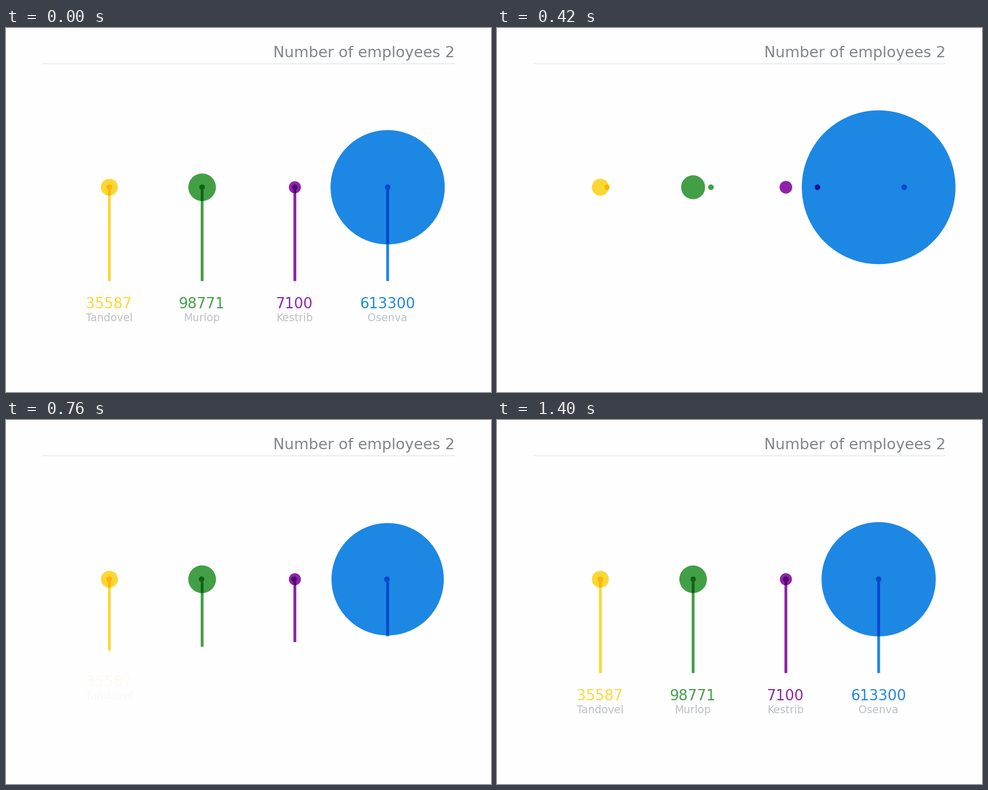
A matplotlib script that plays this animation: 864x648 px, repeating every 5.52 s.

```python
import numpy as np
import matplotlib.pyplot as plt
from matplotlib.animation import FuncAnimation
from matplotlib.colors import to_rgb

W, H = 864, 648
STEP, LOOP = 20, 5520
BLANK_AT, SETTLED = 60, 1600
BACKGROUND = "#fefefe"
MID_Y, DOT_R, STEM_W = 283.5, 5, 5
STEM_TOP, STEM_BOTTOM = 288.5, 450.5
# Each kind of part starts staggered but ends together.
DOT_END, STEM_END, FADE_END = 1590, 1310, 1400

plt.rcParams["font.family"] = "DejaVu Sans"


class Item:
    def __init__(self, index, name, value, color, bubble_at, dot_at):
        self.x = 432 + (index - 1.5) * 165.25
        self.radius = 9.7 + 1.5e-4 * value
        self.rgb = np.array(to_rgb(color))
        self.bubble_at = bubble_at
        self.dot_at = dot_at
        self.stem_at = 530 + 30 * index
        self.fade_at = 746 + 20 * index
        self.slide_at = 770 + 17 * index
        self.texts = [
            (label(self.x - 0.7, 499, str(value), 25.8, color), 499),
            (label(self.x - 0.7, 522, name, 18.9, "#bdc1c6"), 522),
        ]


def label(x, y, text, size, color, ha="center"):
    return fig.text(x / W, 1 - y / H, text, size=size, color=color,
                    ha=ha, va="baseline")


def ease_out(t, start, end, power):
    p = np.clip((t - start) / (end - start), 0, 1)
    return 1 - (1 - p) ** power


def elastic(t, start, duration=785):
    u = 10 * (t - start) / duration
    if u <= 0:
        return 0
    return 1 - 2 ** -u * np.cos(u * 2 * np.pi / 3)


def dot_travel(t, start):
    """Damped swing from 0 to 1, or None before launch."""
    if t < start:
        return None
    s = 1424 * (t - start) / (DOT_END - start) - 117
    return 1 + 0.38 * np.exp(-0.0098 * s) * np.sin(0.0085 * s)


def multiply(img, x0, x1, y0, y1, rgb, coverage):
    """Multiply a colour into a window, weighted by antialiased coverage."""
    left, right = max(int(x0) - 1, 0), min(int(x1) + 2, W)
    top, bottom = max(int(y0) - 1, 0), min(int(y1) + 2, H)
    if left >= right or top >= bottom:
        return
    px = np.arange(left, right)[None, :] + 0.5
    py = np.arange(top, bottom)[:, None] + 0.5
    cover = coverage(px, py)[..., None]
    img[top:bottom, left:right] *= 1 - cover * (1 - rgb)


def disc(img, x, y, r, rgb):
    if r > 0:
        multiply(img, x - r, x + r, y - r, y + r, rgb,
                 lambda px, py: np.clip(r + 0.5 - np.hypot(px - x, py - y), 0, 1))


def bar(img, x, top, bottom, width, rgb):
    def span(p, a, b):
        return np.clip(np.minimum(p + 0.5, b) - np.maximum(p - 0.5, a), 0, 1)

    a, b = x - width / 2, x + width / 2
    if bottom > top:
        multiply(img, a, b, top, bottom, rgb,
                 lambda px, py: span(px, a, b) * span(py, top, bottom))


def paint(t):
    img = np.empty((H, W, 3))
    img[:] = to_rgb(BACKGROUND)
    for item in items:
        disc(img, item.x, MID_Y, item.radius * elastic(t, item.bubble_at), item.rgb)
        travel = dot_travel(t, item.dot_at)
        if travel is not None:
            disc(img, item.x * travel, MID_Y, DOT_R, item.rgb)
        grown = ease_out(t, item.stem_at, STEM_END, 4)
        bar(img, item.x, STEM_TOP, STEM_TOP + (STEM_BOTTOM - STEM_TOP) * grown,
            STEM_W, item.rgb)
    return img


def update(frame):
    t = frame * STEP
    if t < BLANK_AT or t > SETTLED:
        t = LOOP
    canvas.set_data(settled if t == LOOP else paint(t))
    for item in items:
        alpha = ease_out(t, item.fade_at, FADE_END, 4)
        lift = 25 * (1 - ease_out(t, item.slide_at, item.slide_at + 400, 3))
        for text, y in item.texts:
            text.set_alpha(alpha)
            text.set_y(1 - (y - lift) / H)
    return []


fig = plt.figure(figsize=(W / 72, H / 72), dpi=72, facecolor=BACKGROUND)

items = [
    Item(0, "Tandovel", 35587, "#fdd835", 121, 112.7),
    Item(1, "Murlop", 98771, "#43a047", 192, 165),
    Item(2, "Kestrib", 7100, "#8e24aa", 251, 227),
    Item(3, "Osenva", 613300, "#1e88e5", 300, 288),
]
settled = paint(LOOP)
canvas = fig.figimage(settled, origin="upper", zorder=-1)

label(799.2, 52.5, "Number of employees 2", 26.9, "#80868b", ha="right")
fig.add_artist(plt.Line2D([64.8 / W, 799.2 / W], [1 - 63 / H] * 2,
                          color="#e3e8ea", lw=1.35, solid_capstyle="butt"))

anim = FuncAnimation(fig, update, frames=LOOP // STEP, interval=STEP,
                     repeat=True, repeat_delay=0)
plt.show()
```
